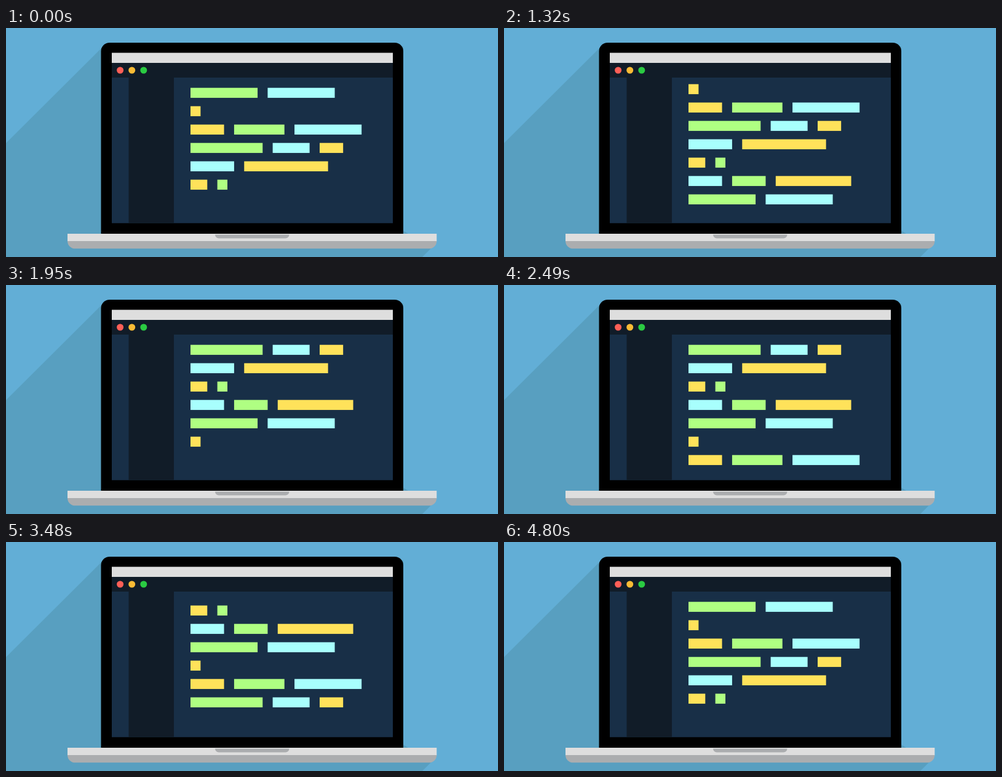
Animation, 800 px wide and 374 px high, one loop 4.83 s. Source, as an HTML page:

```html
<!DOCTYPE html>
<html lang="en">
<head>
<meta charset="utf-8">
<title>Coding laptop</title>
<style>
  html, body { margin: 0; width: 100%; height: 100%; overflow: hidden; background: #62aed6; }
  svg { display: block; width: 800px; height: 374px; }
</style>
</head>
<body>
<svg viewBox="0 0 800 374" xmlns="http://www.w3.org/2000/svg">
  <path fill="#589fc0" d="M158 30L0 188V374H677L700 351V336H654L646 331V30Z"/>
  <path d="M154.500 336V38a14 14 0 0 1 14-14H632a14 14 0 0 1 14 14V336Z"/>
  <path fill="#dedede" d="M172 40.500H629V57H172ZM100 336H700.300V348.500H100Z"/>
  <path fill="#abadaf" d="M100 348H700.300a12.300 12.300 0 0 1-12.300 12.300H112.300a12.300 12.300 0 0 1-12.300-12.300ZM340 337.500H460.500a6 6 0 0 1-6 6H346a6 6 0 0 1-6-6Z"/>
  <path fill="#182f47" d="M172 57H629V318.700H172Z"/>
  <path fill="#111c28" d="M172 57H629V81H172ZM199.500 81H273V318.700H199.500Z"/>
  <circle cx="185.600" cy="69" r="5.500" fill="#fe5f57"/>
  <circle cx="204.700" cy="69" r="5.500" fill="#f9bb35"/>
  <circle cx="223.800" cy="69" r="5.500" fill="#2acb42"/>
  <g id="code"></g>
</svg>
<script>
const NS = 'http://www.w3.org/2000/svg';
const UNIT = 30 / 11, LEFT = 300, TOP = 97.7, LINE = 30;
const TICK = 30, TICKS = 161, SCROLL = 5, PAUSE = 3, SEED = 2.3;
const COLORS = { g: '#afff82', c: '#a8fffd', y: '#ffe25a' };
const LINES = ['c20 g20 y45', 'g40 c40', 'y6', 'y20 g30 c40', 'g43 c22 y14', 'c26 y50', 'y10 g6'];

const clamp = v => Math.max(0, Math.min(1, v));
const code = document.getElementById('code');

// Lay the lines out in space and, one after another, in ticks.
let tick = 1;
const rows = LINES.map(line => {
  const group = code.appendChild(document.createElementNS(NS, 'g'));
  const start = tick;
  let x = LEFT, size;
  const bars = line.split(' ').map(word => {
    size = +word.slice(1);
    const el = group.appendChild(document.createElementNS(NS, 'rect'));
    const bar = { el, width: size * UNIT, start: tick, ticks: size >= 40 ? 5 : 2 };
    el.setAttribute('x', x);
    el.setAttribute('height', 6 * UNIT);
    el.setAttribute('fill', COLORS[word[0]]);
    x += bar.width + 6 * UNIT;
    tick += bar.ticks + PAUSE;
    return bar;
  });
  if (size === 6) tick += 4; // longer rest after a tiny last word
  const scroll = tick;
  tick += SCROLL + PAUSE;
  return { group, bars, start, scroll };
});

function typed(bar, now) {
  if (now < bar.start) return 0;
  return SEED + (bar.width - SEED) * clamp((now - bar.start) / bar.ticks);
}

function draw(now) {
  let current = 0;
  rows.forEach((row, i) => { if (now >= row.start) current = i; });
  const step = Math.max(0, Math.min(SCROLL, now - rows[current].scroll));
  const n = rows.length;

  rows.forEach((row, i) => {
    const slot = (i - current - 1 + n) % n;
    const y = TOP + LINE * (slot - step / SCROLL);
    row.group.setAttribute('transform', `translate(0 ${y})`);
    // The top line drops out just after it starts to move.
    row.group.setAttribute('visibility', slot === 0 && step > 1 ? 'hidden' : 'visible');
    row.bars.forEach(bar =>
      bar.el.setAttribute('width', i === current ? typed(bar, now) : bar.width));
  });
}

let origin;
function frame(time) {
  origin ??= time;
  draw(Math.floor(Math.max(0, time - origin) / TICK) % TICKS);
  requestAnimationFrame(frame);
}
draw(0);
requestAnimationFrame(frame);
</script>
</body>
</html>
```
